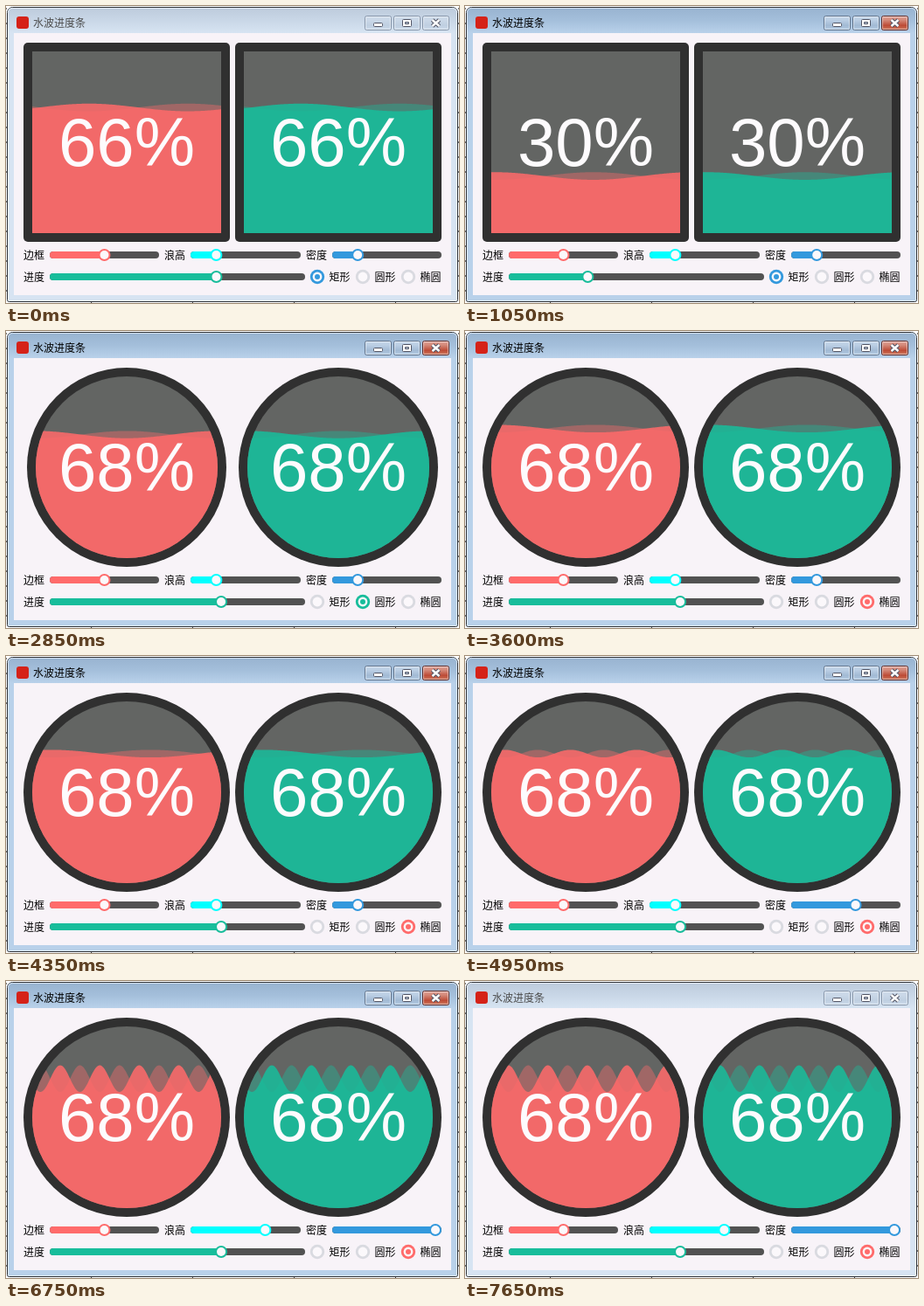
Recreate the animation shown at these times as an HTML page with a canvas. Size 518 px wide and 340 px high, loop 7.8 s.

```html
<!DOCTYPE html>
<html lang="zh-CN">
<head>
<meta charset="utf-8">
<style>
html, body { margin: 0; width: 100%; height: 100%; overflow: hidden; background: #fff; }
canvas { display: block; }
</style>
</head>
<body>
<canvas id="stage" width="518" height="340"></canvas>
<script>
const ctx = document.getElementById('stage').getContext('2d');
const LOOP = 7800, STEP = 150, TAU = Math.PI * 2;
const UI_FONT = '12px "Noto Sans CJK SC", "Noto Sans CJK", sans-serif';
const DARK = '#303030', GREEN = '#18bd9b', RED = '#ff6b6b', CYAN = '#00ffff', BLUE = '#3399dd';

// Each track is a list of [time, value], linear between points.
const TRACKS = {
  progress: [[0, 66], [300, 66], [1050, 30], [1200, 30], [1950, 68]],
  density: [[4500, 2], [5400, 10]],
  height: [[5850, 2], [6600, 7]],
  phase: [[0, 2.63], [1050, 10.61], [2850, 23.56], [4350, 35.24], [6750, 55.43], [7650, 63.44]]
};

function at(track, t) {
  if (t <= track[0][0]) return track[0][1];
  for (let i = 1; i < track.length; i++) {
    const [t0, v0] = track[i - 1], [t1, v1] = track[i];
    if (t <= t1) return v0 + (v1 - v0) * (t - t0) / (t1 - t0);
  }
  return track[track.length - 1][1];
}

function box(x, y, w, h, fill) {
  ctx.fillStyle = fill;
  ctx.fillRect(x, y, w, h);
}

function round(x, y, w, h, r, fill, stroke) {
  ctx.beginPath();
  ctx.roundRect(x, y, w, h, r);
  if (fill) { ctx.fillStyle = fill; ctx.fill(); }
  if (stroke) { ctx.lineWidth = 1; ctx.strokeStyle = stroke; ctx.stroke(); }
}

function disc(x, y, r, fill) {
  ctx.beginPath();
  ctx.arc(x, y, r, 0, TAU);
  ctx.fillStyle = fill;
  ctx.fill();
}

function text(s, x, y, color = '#000') {
  ctx.font = UI_FONT;
  ctx.textAlign = 'left';
  ctx.fillStyle = color;
  ctx.fillText(s, x, y);
}

function vertical(y0, y1, ...colors) {
  const g = ctx.createLinearGradient(0, y0, 0, y1);
  colors.forEach((c, i) => g.addColorStop(i / (colors.length - 1), c));
  return g;
}

function drawButtons(active) {
  const face = active
    ? vertical(11, 28, '#c9d9ea', '#b9cde3', '#a2bad4', '#b8cfe6')
    : vertical(11, 28, '#d0dceb', '#c9d7e7', '#bfcfe1', '#d0deed');
  const red = vertical(11, 28, '#e3aaa0', '#d28474', '#bd4a35', '#d28468');
  const edge = active ? '#62758d' : '#8796aa';
  [[410.5, 30], [443.5, 30], [476.5, 30]].forEach(([x, w], i) => {
    round(x, 11.5, w, 16, 2, active && i === 2 ? red : face, active && i === 2 ? '#602d2b' : edge);
    round(x + 1, 12.5, w - 2, 14, 1, null, 'rgba(255,255,255,.45)');
  });
  const ink = '#535666';
  round(420.5, 19.5, 10, 4, 1, '#fff', ink);
  round(453.5, 15.5, 10, 8, 1, '#fff', ink);
  round(456.5, 18.5, 4, 2, 0, '#b5c5d8', ink);
  ctx.lineCap = 'butt';
  for (const [width, color] of [[4.6, ink], [2.4, '#fff']]) {
    ctx.lineWidth = width;
    ctx.strokeStyle = color;
    ctx.beginPath();
    ctx.moveTo(487.5, 16); ctx.lineTo(495.5, 23);
    ctx.moveTo(495.5, 16); ctx.lineTo(487.5, 23);
    ctx.stroke();
  }
}

function drawWindow(active) {
  box(0, 0, 518, 340, '#fff');
  for (let y = 2; y < 340; y += 17) {
    box(0, y, 1, 2, '#777');
    box(517, y, 1, 2, '#777');
  }
  for (let x = 97; x < 518; x += 116) box(x, 338, 1, 2, '#444');

  const frame = active ? '#b9d1ea' : '#d7e4f2';
  round(1.5, 1.5, 515, 337, [6, 6, 2, 2], frame, '#2b3037');
  round(2, 2, 514, 29, [5, 5, 0, 0],
    active ? vertical(2, 31, '#98b3d0', '#a4bfdb', '#b9d1ea') : vertical(2, 31, '#bdcbdc', '#c9d7e7', '#d7e4f2'));
  round(2.5, 2.5, 513, 335, [5, 5, 1, 1], null, 'rgba(255,255,255,.55)');
  box(9, 31, 500, 300, '#f8f3f8');
  round(12, 12, 14, 14, 3, '#d52218');
  text('水波进度条', 31, 24, active ? '#000' : '#4c4c4c');
  drawButtons(active);
}

function outline(shape, x, y, w, h) {
  ctx.beginPath();
  if (shape === 'rect') ctx.rect(x, y, w, h);
  else ctx.ellipse(x + w / 2, y + h / 2, w / 2, h / 2, 0, 0, TAU);
}

function drawWave(area, s, shift) {
  const w = s.density * Math.PI / area.w;
  const amp = area.h * s.height / 100;
  const level = area.y + area.h * (1 - s.progress / 100);
  ctx.beginPath();
  ctx.moveTo(area.x, 270);
  for (let x = 0; x <= area.w + 10; x++) {
    ctx.lineTo(area.x + x, level + amp * Math.sin(w * x + s.phase + shift));
  }
  ctx.lineTo(area.x + area.w + 10, 270);
  ctx.fill();
}

function drawGauge(left, color, s) {
  const circle = s.shape === 'circle';
  const x = circle ? left + 4 : left, w = circle ? 228 : 236;
  const area = circle ? { x: x + 10, y: 52, w: 208, h: 208 } : { x, y: 42, w: 226, h: 218 };

  if (s.shape === 'rect') round(x, 42, w, 228, 5, DARK);
  else {
    outline(s.shape, x, 42, w, 228);
    ctx.fillStyle = DARK;
    ctx.fill();
  }
  ctx.save();
  outline(s.shape, x + 10, 52, w - 20, 208);
  ctx.fillStyle = '#636563';
  ctx.fill();
  ctx.clip();
  ctx.fillStyle = color;
  ctx.globalAlpha = 0.39;
  drawWave(area, s, s.density * Math.PI / 2);
  ctx.globalAlpha = 0.86;
  drawWave(area, s, 0);
  ctx.restore();

  ctx.font = '78px "Liberation Sans", Arial, sans-serif';
  ctx.textAlign = 'center';
  ctx.fillStyle = '#fdfbfd';
  ctx.fillText(s.progress + '%', left + 118, 183);
}

function drawSlider(label, labelX, x, y, length, ratio, color) {
  const knob = x + 7 + ratio * (length - 14);
  text(label, labelX, y + 5);
  round(x, y - 4, length, 8, 4, '#525252');
  round(x, y - 4, knob - x, 8, [4, 0, 0, 4], color);
  disc(knob, y, 7, color);
  disc(knob, y, 5, '#fbf8fb');
}

function drawRadio(label, x, checked, color) {
  disc(x, 310, 8.2, checked ? color : '#d9dae0');
  disc(x, 310, 5.4, '#fbf8fb');
  if (checked) disc(x, 310, 3, color);
  text(label, x + 13.5, 315);
}

function draw(t) {
  const s = {
    progress: Math.round(at(TRACKS.progress, t)),
    density: Math.round(at(TRACKS.density, t)),
    height: Math.round(at(TRACKS.height, t)),
    phase: at(TRACKS.phase, t),
    shape: t < 2400 ? 'rect' : t < 3600 ? 'circle' : 'ellipse'
  };
  drawWindow(t >= 300 && t < 7500);
  drawGauge(20, RED, s);
  drawGauge(262, GREEN, s);
  drawSlider('边框', 20, 50, 285, 125, 0.5, RED);
  drawSlider('浪高', 181, 211, 285, 126, s.height / 10, CYAN);
  drawSlider('密度', 343, 373, 285, 125, s.density / 10, BLUE);
  drawSlider('进度', 20, 50, 310, 292, s.progress / 100, GREEN);
  drawRadio('矩形', 356, s.shape === 'rect', BLUE);
  drawRadio('圆形', 408, s.shape === 'circle', GREEN);
  drawRadio('椭圆', 460, s.shape === 'ellipse', RED);
}

function tick() {
  const t = performance.now() % LOOP;
  draw(Math.floor(t / STEP) * STEP);
  requestAnimationFrame(tick);
}
tick();
</script>
</body>
</html>
```
